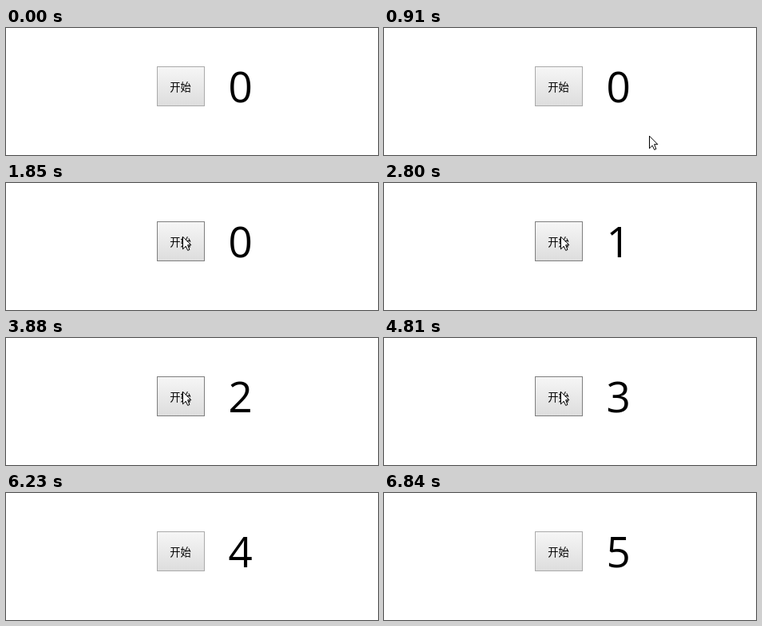
An HTML page for the animation above (6.92 s loop, 466x159 px).

```html
<!DOCTYPE html>
<html lang="zh-CN">
<head>
<meta charset="utf-8">
<title>计数</title>
<style>
  html, body { margin: 0; width: 100%; height: 100%; overflow: hidden; background: #fff; }
  svg { display: block; width: 466px; height: 159px; }
  #label { font: 13.33px "Noto Sans CJK SC", "Noto Sans CJK", "Noto Sans CJK JP", sans-serif; text-anchor: middle; }
  #count { font: 53px "Open Sans", "Noto Sans", sans-serif; }
</style>
</head>
<body>
<svg viewBox="0 0 466 159">
  <defs>
    <linearGradient id="up" x2="0" y2="1">
      <stop stop-color="#f6f6f6"/><stop offset="1" stop-color="#ddd"/>
    </linearGradient>
    <linearGradient id="down" x2="0" y2="1">
      <stop stop-color="#ddd"/><stop offset="1" stop-color="#f6f6f6"/>
    </linearGradient>
  </defs>
  <rect id="button" x="189.5" y="48.5" width="59" height="49"/>
  <text id="label" x="218.6" y="79">开始</text>
  <text id="count" x="278.6" y="93"></text>
  <path id="cursor" fill="#fff" stroke="#000" d="M.5 1.2V16.8L4.2 13.2L6.7 18.4L8.9 17.5L6.6 11.7H10.9Z"/>
</svg>
<script>
const LOOP = 6920, START = 910, STEP = 156;
const PRESS = 5, TICK = 6.5;
// Pointer key points: step, x, y
const path = [
  [0, 332, 134], [2, 231, 77], [3, 221, 66], [27, 221, 66],
  [28, 229, 70], [29, 280, 111], [33, 403, 155]
];
const [button, count, cursor] =
  ["button", "count", "cursor"].map(id => document.getElementById(id));

const within = (v, from, to) => v >= from && v < to;

function pointer(step) {
  const i = path.findIndex(key => key[0] >= step);
  if (step < 0 || i < 0) return null;
  const [s1, x1, y1] = path[i];
  const [s0, x0, y0] = path[Math.max(0, i - 1)];
  const p = s1 > s0 ? (step - s0) / (s1 - s0) : 1;
  return [x0 + (x1 - x0) * p, y0 + (y1 - y0) * p].map(Math.round);
}

function draw(t) {
  const step = Math.floor((t - START) / STEP);
  const at = pointer(step);
  const hover = at && within(at[0], 189, 249) && within(at[1], 48, 98);
  cursor.setAttribute("visibility", at ? "visible" : "hidden");
  if (at) cursor.setAttribute("transform", `translate(${at})`);
  button.setAttribute("stroke", hover ? "#7f7f7f" : "#aaa");
  button.setAttribute("fill", step === PRESS ? "url(#down)" : "url(#up)");
  count.textContent = Math.max(0, Math.floor((step - PRESS - 0.5) / TICK));
}

const start = performance.now();
function frame() {
  draw((performance.now() - start) % LOOP);
  requestAnimationFrame(frame);
}
frame();
</script>
</body>
</html>
```
